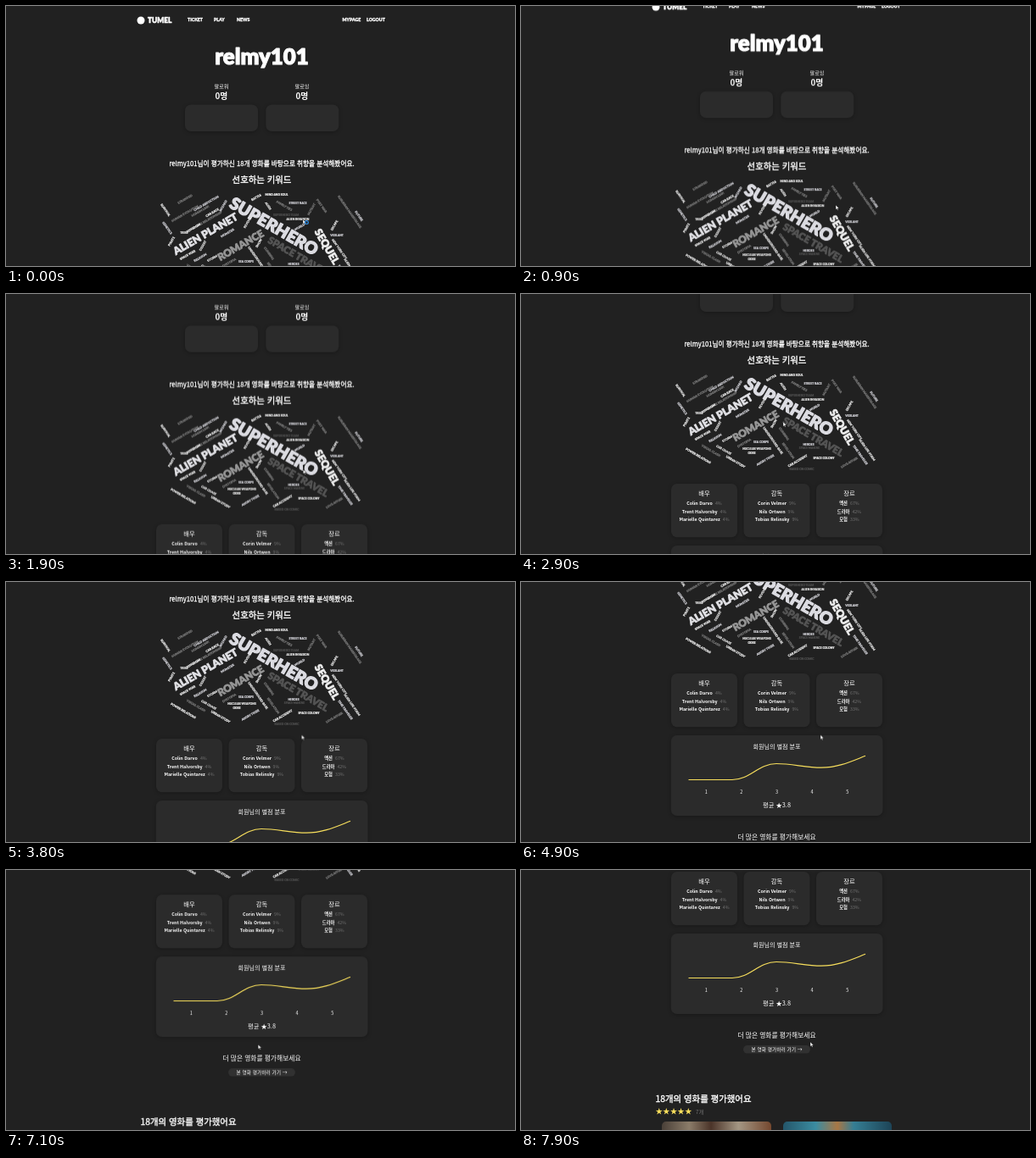
Animation of 600 by 307 pixels, one loop 8 s. Source, as an HTML page:

```html
<!DOCTYPE html>
<html lang="ko">
<head>
<meta charset="utf-8">
<title>Profile</title>
<style>
  html, body { margin: 0; width: 100%; height: 100%; overflow: hidden; background: #212121; }
  svg { display: block; width: 100vw; height: 100vh; }
  text { font-family: "Noto Sans CJK KR", "Noto Sans CJK", "Noto Sans", sans-serif; color: #fff; fill: currentColor; text-anchor: middle; }
  .display { font-family: Lato, sans-serif; font-weight: 900; stroke: currentColor; stroke-width: .06em; stroke-linejoin: round; }
  .left, .left text { text-anchor: start; }
  .nav text { font-size: 5.2px; }
  .nav .brand { font-size: 8.3px; }
  .name { font-size: 25.8px; stroke-width: .04em; }
  .tiny { font-size: 6.2px; }
  .count { font-size: 9.8px; font-weight: 700; }
  .lead { font-size: 7.75px; }
  .heading { font-size: 10.4px; }
  .lead, .heading { stroke: currentColor; stroke-width: .035em; }
  .lead.light { stroke: none; }
  .label { font-size: 7.3px; }
  .row { font-size: 5.3px; font-weight: 700; }
  .row tspan { font-weight: 400; fill: #707070; }
  .card { fill: #2b2b2b; filter: drop-shadow(0 1.5px 2px rgba(0, 0, 0, .28)); }
  .stars { font-size: 8.6px; color: #f8df5c; }

  #page { animation: scroll 8s infinite; }
  #pointer { animation: point 8s infinite; }
  #busy { animation: busy 8s step-end infinite; }

  @keyframes scroll {
    0% { transform: translateY(0); animation-timing-function: step-end; }
    8.75% { transform: translateY(0); animation-timing-function: steps(7); }
    17.5% { transform: translateY(-55.5px); animation-timing-function: steps(15); }
    36.25% { transform: translateY(-127px); animation-timing-function: steps(9); }
    47.5% { transform: translateY(-166px); animation-timing-function: steps(2); }
    50%, 51.25% { transform: translateY(-182px); animation-timing-function: steps(5); }
    57.5%, 58.75% { transform: translateY(-234px); animation-timing-function: steps(2); }
    61.25% { transform: translateY(-243px); animation-timing-function: steps(13); }
    77.5% { transform: translateY(-285.5px); animation-timing-function: steps(12); }
    92.5%, 93.75% { transform: translateY(-334px); animation-timing-function: steps(4); }
    98.75%, 100% { transform: translateY(-349px); }
  }
  @keyframes point {
    0% { transform: translate(350px, 252px); animation-timing-function: steps(6); }
    7.5%, 8.75% { transform: translate(371px, 235px); animation-timing-function: step-end; }
    17.5% { transform: translate(371px, 235px); animation-timing-function: steps(15); }
    36.25% { transform: translate(309px, 151px); animation-timing-function: steps(9); }
    47.5% { transform: translate(348.5px, 180.5px); animation-timing-function: steps(11); }
    61.25% { transform: translate(353px, 180.5px); animation-timing-function: steps(13); }
    77.5% { transform: translate(248px, 209.5px); animation-timing-function: steps(17); }
    98.75%, 100% { transform: translate(341px, 203px); }
  }
  @keyframes busy { 0% { opacity: 1; } 7.5%, 100% { opacity: 0; } }
</style>
</head>
<body>
<svg viewBox="0 0 600 307" preserveAspectRatio="none">
  <defs>
    <linearGradient id="kitchen">
      <stop offset="0" stop-color="#4a4038"/><stop offset=".25" stop-color="#8b7c69"/>
      <stop offset=".45" stop-color="#4b3429"/><stop offset=".7" stop-color="#a39683"/>
      <stop offset="1" stop-color="#75482f"/>
    </linearGradient>
    <linearGradient id="ocean">
      <stop offset="0" stop-color="#24566a"/><stop offset=".3" stop-color="#3b8ca1"/>
      <stop offset=".5" stop-color="#a87745"/><stop offset=".65" stop-color="#357e94"/>
      <stop offset="1" stop-color="#1d4457"/>
    </linearGradient>
  </defs>

  <g id="page">
    <g class="nav left">
      <circle cx="159" cy="17" r="4.5" fill="#fff"/>
      <text class="display brand" x="167" y="19.8">TUMEL</text>
      <text class="display" x="214" y="18.4">TICKET</text>
      <text class="display" x="245" y="18.4">PLAY</text>
      <text class="display" x="272" y="18.4">NEWS</text>
      <text class="display" x="396.5" y="18.4">MYPAGE</text>
      <text class="display" x="425" y="18.4">LOGOUT</text>
    </g>

    <text class="display name" x="301.5" y="69.3">relmy101</text>
    <text class="tiny" x="254" y="97.3">팔로워</text>
    <text class="tiny" x="349" y="97.3">팔로잉</text>
    <text class="count" x="254" y="110">0명</text>
    <text class="count" x="349" y="110">0명</text>
    <rect class="card" x="211" y="116.5" width="86" height="31.5" rx="7"/>
    <rect class="card" x="306.3" y="116.5" width="86" height="31.5" rx="7"/>

    <text class="lead" x="301.5" y="188.7" style="font-size:7.65px">relmy101님이 평가하신 18개 영화를 바탕으로 취향을 분석해봤어요.</text>
    <text class="heading" x="301.5" y="209">선호하는 키워드</text>
    <g id="cloud"></g>
    <g id="cards"></g>

    <rect class="card" x="176.8" y="424" width="249.7" height="95" rx="7"/>
    <text class="label" x="301.5" y="439.8" style="font-size:7.05px">회원님의 별점 분포</text>
    <path d="M197.5 476.5H249C270 476.5 280 457.5 301 457.5C320 457.5 335 462.2 354 462.2C374 462.2 390 454.5 406 448.3"
          fill="none" stroke="#f8df5c" stroke-width="1.2"/>
    <g id="axis"></g>
    <text class="label" x="301.5" y="509.3">평균 ★3.8</text>

    <text class="lead light" x="301.5" y="546.5">더 많은 영화를 평가해보세요</text>
    <rect x="262" y="556" width="79" height="9.6" rx="4.8" fill="#313131"/>
    <text x="301.5" y="562.8" font-size="5.75">본 영화 평가하러 가기 →</text>

    <g class="left">
      <text class="heading" x="158.5" y="623">18개의 영화를 평가했어요</text>
      <text class="stars" x="158.5" y="637.3">★★★★★</text>
      <text class="tiny" x="206" y="636.5" style="color:#777">7개</text>
    </g>
    <rect x="166" y="646" width="129" height="70" rx="5" fill="url(#kitchen)"/>
    <rect x="309" y="646" width="128" height="70" rx="5" fill="url(#ocean)"/>
  </g>

  <g id="pointer">
    <path d="M0 0V5.4L1.3 4.3L2.2 6.2L3.1 5.8L2.2 3.9H3.9Z" fill="#fff" stroke="#111" stroke-width=".4"/>
    <circle id="busy" cx="4.4" cy="3.6" r="1.9" fill="none" stroke="#2f8fe8" stroke-width="1.2"/>
  </g>
</svg>

<script>
  const byId = id => document.getElementById(id);

  const word = (text, x, y, angle, size, color) =>
    `<text class="display" transform="translate(${x} ${y}) rotate(${angle})" dy=".36em" font-size="${size}" style="color:${color}">${text}</text>`;

  const bigWords = [
    ['SUPERHERO', 316, 260, 30, 19.5, '#dcdce2'],
    ['ALIEN PLANET', 235, 269, -30, 12.3, '#e2e2e6'],
    ['ROMANCE', 276.5, 282.5, -30, 11.8, '#979797'],
    ['SPACE TRAVEL', 344.5, 295.5, 30, 11.5, '#555'],
    ['SEQUEL', 378.5, 284, 60, 12.2, '#eee'],
  ];

  // Small words by angle; a leading "-" marks a faint one.
  const smallWords = {
    0: `MIND AND SOUL@319,223|STREET RACE@344,233|ALIEN INVASION@344,252|-SUPERHERO TEAM@330,247
      |SEA CORPS@283,302|NUCLEAR WEAPONS@278,310|OGRE@272,315|HEROES@339,305|-SPACE MARINE@340,309
      |SPACE COLONY@357,321|VIGILANT@390,271|TRIBE@210,268|-BASED ON COMIC@331,334`,
    '-30': `-STRANDED@211,228|CHILD ABDUCTION@236,233|-HUMAN LINK@229,242|CAR RACE@243,244
      |-HUMAN EVOLUTION@211,245|-ONLINE RELATIONSHIP@237,253|SPACE WAR@214,294|RELIGION@229,297
      |STORM@243,298|CAR ACCIDENT@326,324|ANGRY TIGER@288,323|-LOVE AFFAIR@387,326|BATTLE@295,226
      |WORLD@346,261|-DYSTOPIA@263,303|KINGDOM@221,262|MONSTER@261,268`,
    30: `POWER RELATIONS@209,318|-VISUAL CLASH@224,312|CAR CHASE@239,311|URBAN STUDY@253,325
      |-FAMILY TIES@328,236`,
    '-60': `PIRATE@195,278|WIZARD@256,236|REVENGE@285,255|ESCAPE@387,259|-MUTANT@360,240|DESERT@232,283|SNOW@298,280`,
    55: `SURVIVAL@188,241|GENETICS@190,262|UNDERGROUND BASE@297,300|-SUBURBAN MANSION AGE@405,243
      |FUTURE@416,248|NEW YORK CITY@393,287|-POST WAR@372,236|TIME TRAVELER@400,317
      |ALIEN LIFE-FORM@408,311|-REVELATION@315,312|-CLIMBING@310,292|ALIEN@309,236`,
  };

  const smallWord = (entry, index, angle) => {
    const [name, place] = entry.trim().split('@');
    const faint = name.startsWith('-');
    const shade = faint ? (angle === '0' ? '#4c4c4c' : '#787878') : ['#f0f0f0', '#d0d0d6', '#e2e2e2'][index % 3];
    return word(faint ? name.slice(1) : name, ...place.split(','), angle, angle === '0' ? 3.35 : 3.6, shade);
  };

  byId('cloud').innerHTML = bigWords.map(w => word(...w)).join('') +
    Object.entries(smallWords).flatMap(([angle, list]) =>
      list.split('|').map((entry, i) => smallWord(entry, i, angle))).join('');

  const cards = [
    ['배우', 'Colin Darvo 4%', 'Trent Halvorsby 4%', 'Marielle Quintarez 4%'],
    ['감독', 'Corin Velmer 9%', 'Nils Ortwen 9%', 'Tobias Relinsky 9%'],
    ['장르', '액션 67%', '드라마 42%', '모험 33%'],
  ];
  byId('cards').innerHTML = cards.map(([title, ...rows], i) => {
    const x = 216 + i * 85.5;
    const lines = rows.map((row, k) => {
      const [, name, share] = row.match(/(.*) (.*)/);
      return `<text class="row" x="${x}" y="${376.2 + k * 9.3}">${name}<tspan dx="3">${share}</tspan></text>`;
    });
    return `<rect class="card" x="${x - 39}" y="351" width="78" height="63.3" rx="7"/>
      <text class="label" x="${x}" y="365">${title}</text>${lines.join('')}`;
  }).join('');

  byId('axis').innerHTML = [1, 2, 3, 4, 5].map(n =>
    `<text x="${176.7 + n * 41.6}" y="493.2" font-size="5.5" font-weight="500">${n}</text>`).join('');
</script>
</body>
</html>
```
